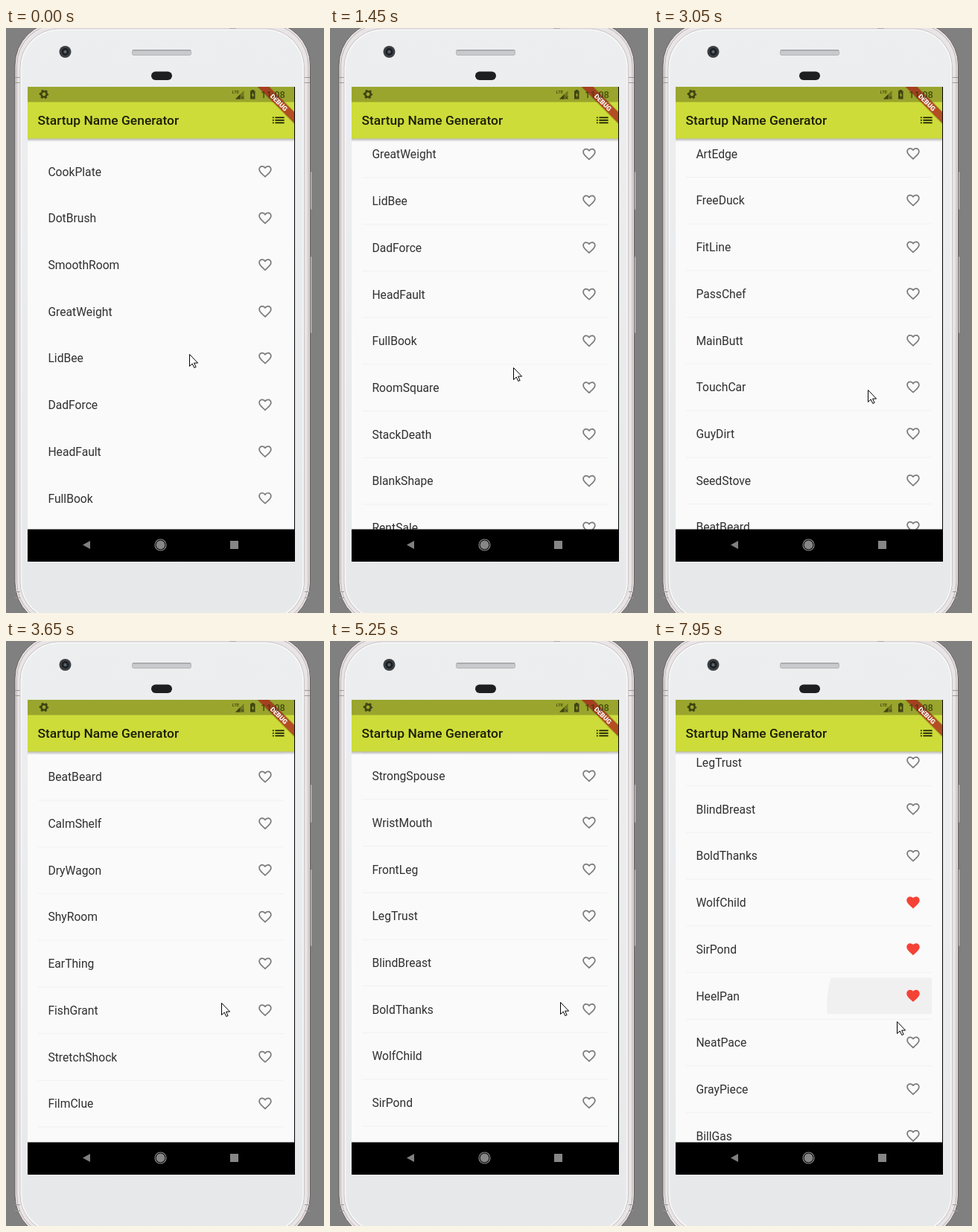
These frames come from a looping animation (427 by 786 pixels, 8000 ms). An HTML page:

```html
<!DOCTYPE html>
<html lang="en">
<head>
<meta charset="utf-8">
<title>Name list</title>
<style>
html, body { margin: 0; width: 100%; height: 100%; overflow: hidden; background: #808080; }
svg { display: block; width: 427px; height: 786px; font-family: Roboto, sans-serif; }
</style>
</head>
<body>
<svg viewBox="0 0 427 786">
  <defs>
    <linearGradient id="shade" x1="0" y1="0" x2="0" y2="1">
      <stop offset="0" stop-color="#000" stop-opacity=".3"/>
      <stop offset="1" stop-color="#000" stop-opacity="0"/>
    </linearGradient>
    <linearGradient id="body" x1="0" y1="0" x2="0" y2="1">
      <stop offset="0" stop-color="#eceeef"/>
      <stop offset="1" stop-color="#e6e8ea"/>
    </linearGradient>
    <clipPath id="list"><rect x="29" y="148" width="358" height="526"/></clipPath>
    <clipPath id="screen"><rect x="29" y="79" width="359" height="638"/></clipPath>
    <path id="outline" d="M16.5 3c-1.74 0-3.41.81-4.5 2.09C10.91 3.81 9.24 3 7.5 3 4.42 3 2 5.42 2 8.5c0 3.78 3.4 6.86 8.55 11.54L12 21.35l1.45-1.32C18.6 15.36 22 12.28 22 8.5 22 5.42 19.58 3 16.5 3zm-4.4 15.55l-.1.1-.1-.1C7.14 14.24 4 11.39 4 8.5 4 6.5 5.5 5 7.5 5c1.54 0 3.04.99 3.57 2.36h1.87C13.46 5.99 14.96 5 16.5 5c2 0 3.5 1.5 3.5 3.5 0 2.89-3.14 5.74-7.9 10.05z"/>
    <path id="solid" d="M12 21.35l-1.45-1.32C5.4 15.36 2 12.28 2 8.5 2 5.42 4.42 3 7.5 3c1.74 0 3.41.81 4.5 2.09C13.09 3.81 14.76 3 16.5 3 19.58 3 22 5.42 22 8.5c0 3.78-3.4 6.86-8.55 11.54z"/>
  </defs>

  <!-- phone body -->
  <rect width="427" height="786" fill="#808080"/>
  <g fill="#e4e2e3" stroke="#a9a5a6" stroke-width=".8">
    <rect x="405" y="193" width="5" height="51" rx="1"/>
    <rect x="405" y="307" width="5" height="103" rx="1"/>
  </g>
  <rect x="12" y="-8" width="396.5" height="811" rx="58" fill="#e9e4e5" stroke="#66605f" stroke-width="1"/>
  <rect x="14.5" y="-5.5" width="391.5" height="806" rx="56" fill="none" stroke="#b9b1b2" stroke-width="1"/>
  <g fill="#9b9697">
    <path d="M12 66h7v1h-7zM12 73h7v1h-7zM401 66h7v1h-7zM401 73h7v1h-7zM12 757h7v1h-7zM12 765h7v1h-7zM401 757h7v1h-7zM401 765h7v1h-7z"/>
    <rect x="300" y="0" width="9" height="3.5"/>
  </g>
  <rect x="19" y="1" width="381.5" height="795" rx="52" fill="url(#body)" stroke="#c9c3c4" stroke-width="1"/>
  <rect x="20.5" y="2.5" width="378.5" height="792" rx="51" fill="none" stroke="#f8f8f8" stroke-width="1.5"/>
  <circle cx="79.500" cy="32" r="8" fill="#3c4043"/>
  <circle cx="79.500" cy="32" r="5" fill="#1c2024"/>
  <circle cx="79.500" cy="32" r="2.200" fill="#59636b"/>
  <rect x="169.500" y="29.500" width="79" height="7" rx="2" fill="#c9cacd" stroke="#b4b5b8"/>
  <path d="M170 30h78" stroke="#97989c"/>
  <rect x="195" y="58.500" width="28" height="11.500" rx="5.700" fill="#1d1f21"/>

  <!-- list -->
  <rect x="29" y="79" width="359" height="638" fill="#000"/>
  <rect x="29" y="148" width="358" height="526" fill="#fafafa"/>
  <g clip-path="url(#list)">
    <g id="ripples"></g>
    <g id="rows"></g>
  </g>
  <rect x="29" y="148" width="358" height="5" fill="url(#shade)"/>

  <!-- bars -->
  <rect x="29" y="99" width="358" height="49.500" fill="#cddc39"/>
  <rect x="29" y="79" width="358" height="20.500" fill="#9aa52d"/>
  <text x="42.500" y="130.300" font-size="17.42" font-weight="500" fill="#1c1e08">Startup Name Generator</text>
  <path transform="translate(355.300 113.500) scale(.871)" fill="#1c1e08" d="M3 13h2v-2H3zm0 4h2v-2H3zm0-8h2V7H3zm4 4h14v-2H7zm0 4h14v-2H7zM7 7v2h14V7z"/>
  <g fill="none" stroke="#3f4412">
    <circle cx="51" cy="89" r="3.700" stroke-width="2.600"/>
    <circle cx="51" cy="89" r="5.300" stroke-width="2" stroke-dasharray="2.775 2.775" stroke-dashoffset="1.390"/>
  </g>
  <g fill="#3f4412">
    <text x="303.500" y="87.500" font-size="6" font-weight="500">LTE</text>
    <path d="M319.500 84v11.500H308z" opacity=".45"/>
    <path d="M314.500 89v6.500H308z"/>
    <path d="M316 92l3.500 3.500M319.500 92L316 95.500" stroke="#3f4412"/>
    <path d="M329.800 83h3v1.300h1.700v11.200h-6.500V84.300h1.800z"/>
    <path d="M331.900 86.500l-2.200 4h1.400v3l2.200-4h-1.400z" fill="#9aa52d"/>
  </g>
  <g clip-path="url(#screen)">
    <g transform="translate(387.500 79) rotate(45)">
      <rect x="-40" y="23.500" width="80" height="12.300" fill="#000" opacity=".16"/>
      <rect x="-40" y="24.400" width="80" height="10.450" fill="#b71c1c" opacity=".68"/>
      <text y="32.800" font-size="8.900" font-weight="900" text-anchor="middle" fill="#fff">DEBUG</text>
    </g>
  </g>
  <text x="342" y="94" font-size="13" font-weight="500" fill="#343810" opacity=".8">11:08</text>
  <path d="M387.500 79v638" stroke="#000"/>

  <!-- navigation -->
  <rect x="29" y="673.500" width="359" height="43.500" fill="#000"/>
  <path d="M103 694.500l10-5.500v11z" fill="#808080"/>
  <circle cx="207.500" cy="694.500" r="7.500" fill="none" stroke="#8c8c8c" stroke-width="1.200"/>
  <circle cx="207.500" cy="694.500" r="5.900" fill="#868686"/>
  <rect x="301" y="689" width="11" height="11" fill="#868686"/>

  <path id="cursor" d="M.5 .5v16l3.700-3.500 2.600 5.500 2.300-1-2.500-5.400h5z" fill="#fff" stroke="#000" stroke-linejoin="round"/>
</svg>
<script>
const LOOP = 8000, PITCH = 62.71, FIRST = 193;
const names = `CookPlate DotBrush SmoothRoom GreatWeight LidBee DadForce HeadFault FullBook
  RoomSquare StackDeath BlankShape RentSale DampStool GladTower ThinLadder
  ArtEdge FreeDuck FitLine PassChef MainButt TouchCar GuyDirt SeedStove BeatBeard CalmShelf DryWagon
  ShyRoom EarThing FishGrant StretchShock FilmClue FirmLunch LunchFire WaistBat PaleHinge LoudCurve
  StrongSpouse WristMouth FrontLeg LegTrust BlindBreast BoldThanks WolfChild SirPond
  HeelPan NeatPace GrayPiece BillGas`.split(/\s+/);

// Keys are [time, value, ...]
const scrollKeys = [[0, 0], [120, 0], [430, 75], [610, 75], [1450, 211.3], [1580, 211.3],
  [2270, 590], [2330, 590], [3050, 964.5], [3110, 964.5], [3880, 1500], [4060, 1500],
  [4300, 1622.1], [4360, 1622.1], [4420, 1634], [4600, 1634], [5250, 2269], [5300, 2269],
  [5420, 2290], [5850, 2475.3]];
const cursorKeys = [[0, 246, 438], [120, 246, 438], [1450, 246, 456], [1580, 246, 456],
  [3050, 287, 486], [3110, 287, 486], [4300, 292, 486], [4360, 292, 486], [5250, 309, 485],
  [5300, 309, 485], [5750, 312, 483], [6190, 338, 343], [6480, 339, 345], [6720, 339, 345],
  [6980, 338, 408], [7150, 338, 408], [7300, 314, 430], [7470, 321, 449], [7600, 338, 478],
  [7760, 338, 478], [7950, 326, 511]];
const taps = [
  { row: 42, x: 344, y: 347, at: 6310, radius: [[6130, 0], [6480, 46], [6720, 46], [7000, 200]],
    alpha: [[6130, .06], [6720, .06], [7020, 0]] },
  { row: 43, x: 340, y: 412, at: 7120, radius: [[7020, 0], [7120, 25], [7400, 160]],
    alpha: [[7020, .06], [7180, .06], [7450, 0]] },
  { row: 44, x: 342, y: 488, at: 7720, radius: [[7620, 0], [7720, 30], [7950, 110]],
    alpha: [[7620, .06], [7760, .06], [7950, .04]] }
];

const $ = id => document.getElementById(id);
function add(parent, tag, attrs, text) {
  const el = document.createElementNS("http://www.w3.org/2000/svg", tag);
  for (const k in attrs) el.setAttribute(k, attrs[k]);
  if (text) el.textContent = text;
  return parent.appendChild(el);
}
const easeOut = p => 1 - (1 - p) ** 2;
const easeInOut = p => p * p * (3 - 2 * p);

function at(keys, t, ease = p => p, col = 1) {
  if (t <= keys[0][0]) return keys[0][col];
  const i = keys.findIndex(k => k[0] > t);
  if (i < 0) return keys[keys.length - 1][col];
  const a = keys[i - 1], b = keys[i];
  return a[col] + (b[col] - a[col]) * ease((t - a[0]) / (b[0] - a[0]));
}

const rows = names.map((name, i) => {
  const g = add($("rows"), "g", { transform: `translate(0 ${FIRST + i * PITCH})` });
  const line = add(g, "path", { d: "M43 31.300h330", stroke: "#f1f1f1" });
  add(g, "text", { x: 56.4, y: 5.6, "font-size": 15.68, fill: "#303030" }, name);
  const heart = add(g, "use", { transform: "translate(337.500 -10.700) scale(.871)" });
  return { line, heart };
});

const endScroll = scrollKeys[scrollKeys.length - 1][1];
for (const tap of taps) {
  const mid = FIRST + tap.row * PITCH - endScroll;
  const clip = add($("ripples"), "clipPath", { id: "tile" + tap.row });
  add(clip, "rect", { x: 43, y: mid - 24.4, width: 330, height: 48.8 });
  const g = add($("ripples"), "g", { "clip-path": `url(#tile${tap.row})` });
  tap.circle = add(g, "circle", { cx: tap.x, cy: tap.y });
}

function setHeart(row, liked) {
  row.heart.setAttribute("href", liked ? "#solid" : "#outline");
  row.heart.setAttribute("fill", liked ? "#f44336" : "#7c7c7c");
}
rows.forEach(row => setHeart(row, false));

function draw(t) {
  const scroll = at(scrollKeys, t, easeOut);
  $("rows").setAttribute("transform", `translate(0 ${-scroll})`);
  for (const row of rows) row.line.setAttribute("opacity", scroll > 0 ? 1 : 0);
  for (const tap of taps) {
    setHeart(rows[tap.row], t >= tap.at);
    tap.circle.setAttribute("r", at(tap.radius, t, easeOut));
    tap.circle.setAttribute("opacity", at(tap.alpha, t));
  }
  const x = at(cursorKeys, t, easeInOut, 1), y = at(cursorKeys, t, easeInOut, 2);
  $("cursor").setAttribute("transform", `translate(${Math.round(x)} ${Math.round(y)})`);
}

function tick() {
  draw(performance.now() % LOOP);
  requestAnimationFrame(tick);
}
tick();
</script>
</body>
</html>
```
